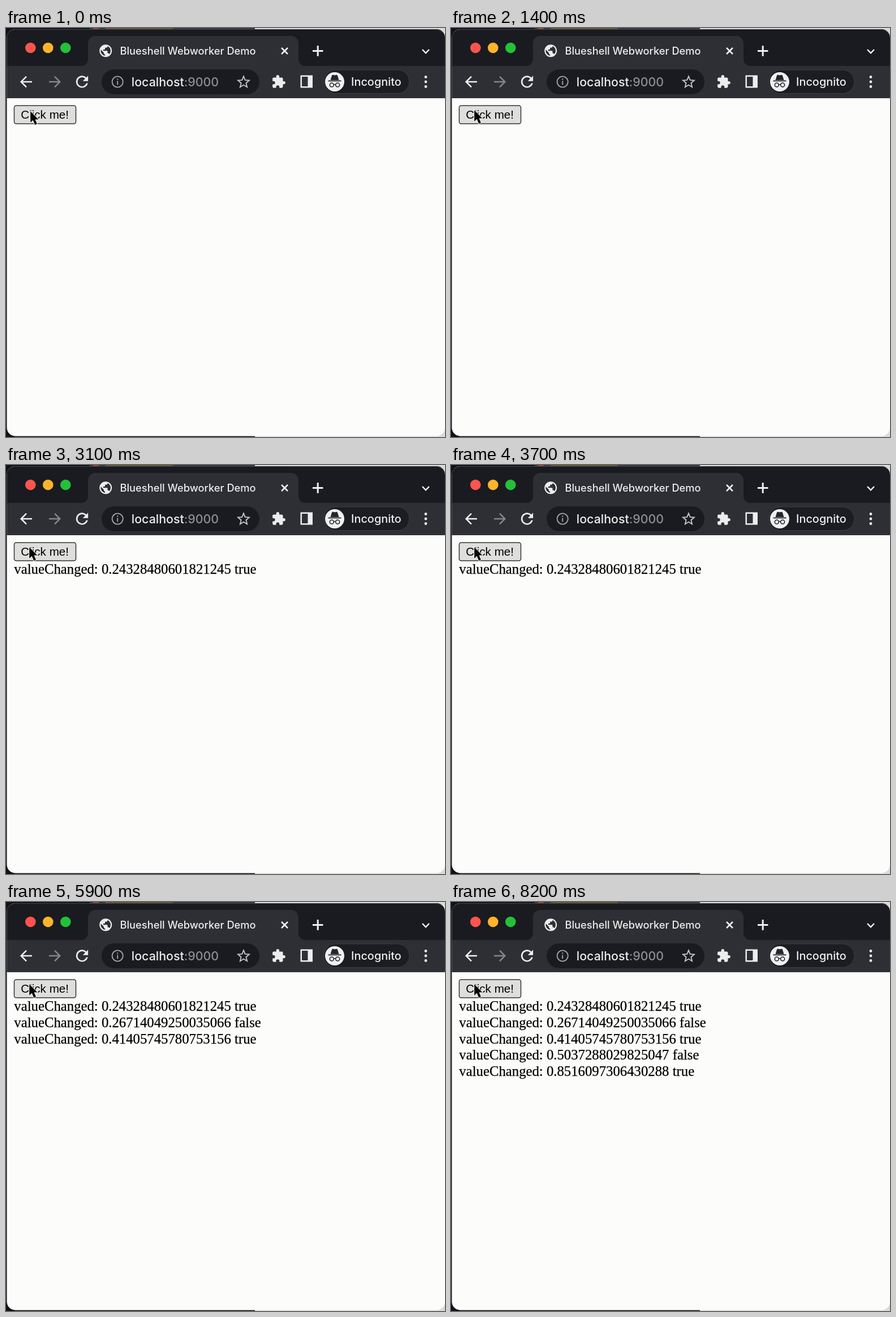
Animation of 776 by 722 pixels, one loop 8300 ms. Source, as an HTML page:

```html
<!DOCTYPE html>
<html lang="en">
<head>
<meta charset="utf-8">
<title>Webworker demo</title>
<style>
  html, body { margin: 0; width: 100%; height: 100%; overflow: hidden; background: #111218; }
  svg { display: block; width: 776px; height: 722px; }
  .ui { font-family: Inter, Roboto, sans-serif; font-weight: 500; fill: #eceded; }
  .button { font: 20.6px "Liberation Sans", Arial, sans-serif; }
  .log { font: 24.75px "Liberation Serif", "Times New Roman", serif; stroke: #000; stroke-width: .25; }
  .line { fill: none; stroke: #f0f0f1; stroke-width: 2.5; }
  .icon { fill: #eceded; }
</style>
</head>
<body>
<svg viewBox="0 0 776 722">
  <!-- desktop behind the window -->
  <path fill="#d9dbd8" d="M440 0H776V722H440z"/>
  <path fill="#35373a" d="M148 0H440V2H148z"/>
  <path fill="#74602f" d="M176 0H295V1.5H176z"/>
  <path fill="#c2472f" d="M154 0h10v1.5h-10z"/>

  <!-- window -->
  <rect x="1.5" y="2" width="774.5" height="718.5" rx="15" fill="#fcfcfb"/>
  <path fill="#191b20" d="M1.5 68V17a15 15 0 0 1 15-15H761a15 15 0 0 1 15 15V68z"/>
  <path fill="none" stroke="#46484c" d="M6 6.500Q10 2.500 16.500 2.500H761Q767 2.500 771 6.500"/>
  <path fill="#2d2f34" d="M1.500 67H133a12 12 0 0 0 12-12V27a13 13 0 0 1 13-13H504a13 13 0 0 1 13 13V55a12 12 0 0 0 12 12H776V124H1.500z"/>
  <path fill="#3a3c40" d="M1.500 123H776v1H1.500z"/>

  <!-- tab strip -->
  <circle cx="43.300" cy="35" r="9.300" fill="#ff544d"/>
  <circle cx="74.300" cy="35" r="9.300" fill="#feb429"/>
  <circle cx="105.300" cy="35" r="9.300" fill="#24c138"/>
  <path class="icon" transform="translate(163 27) scale(1.1)" d="M12 2a10 10 0 1 0 0 20a10 10 0 0 0 0-20zm-1 17.900A8 8 0 0 1 4.200 10.200L9 15v1a2 2 0 0 0 2 2zm6.900-2.500A2 2 0 0 0 16 16h-1v-3a1 1 0 0 0-1-1H8v-2h2a1 1 0 0 0 1-1V7h2a2 2 0 0 0 2-2v-.4a8 8 0 0 1 2.900 12.800z"/>
  <text class="ui" x="201.500" y="47" font-size="18.300">Blueshell Webworker Demo</text>
  <path class="line" d="M487 35l11 11m0-11l-11 11M736 38l6 6.300 6-6.300"/>
  <path class="line" style="stroke-width:3" d="M542 40.500h18.500M551.200 31.300v18.500"/>

  <!-- toolbar -->
  <path class="line" d="M46 95H27m9-9.300L26.700 95l9.300 9.300"/>
  <path class="line" style="stroke:#84868a" d="M76 95H95m-9-9.300l9.300 9.300-9.300 9.300"/>
  <path class="icon" transform="translate(118.500 79) scale(1.330)" d="M17.650 6.350A8 8 0 1 0 19.730 14h-2.080A6 6 0 1 1 16.220 7.780L13 11h7V4z"/>
  <rect x="169" y="73" width="279" height="44" rx="22" fill="#191b20"/>
  <g fill="none" stroke="#a2a4a8" stroke-width="1.900">
    <circle cx="197.200" cy="95" r="9.600"/>
    <path d="M197.200 93.500v6.700M197.200 89.300v2.200"/>
  </g>
  <text class="ui" x="221.800" y="102.500" font-size="21.400">localhost<tspan fill="#8c8e92">:9000</tspan></text>
  <path class="line" style="stroke:#c3c4c7;stroke-width:1.900" d="M420 85.300l2.700 6.600 7.200.6-5.500 4.700 1.700 7-6.100-3.700-6.100 3.700 1.700-7-5.500-4.700 7.200-.6z"/>
  <path class="icon" transform="translate(469 82) scale(1.080)" d="M20.500 11H19V7a2 2 0 0 0-2-2H13V3.500a2.500 2.500 0 0 0-5 0V5H4a2 2 0 0 0-2 2v3.800h1.500a2.700 2.700 0 0 1 0 5.400H2V20a2 2 0 0 0 2 2h3.800v-1.500a2.700 2.700 0 0 1 5.400 0V22H17a2 2 0 0 0 2-2v-4h1.500a2.500 2.500 0 0 0 0-5z"/>
  <path class="icon" fill-rule="evenodd" d="M520.500 83.500H542V105.500H520.500zM523 86V103H533.500V86z"/>
  <rect x="562" y="74" width="151" height="41.500" rx="20.700" fill="#1b1d22" stroke="#3b3d42"/>
  <circle cx="581" cy="95" r="17" fill="#f0f0f1"/>
  <g fill="#24262b">
    <path d="M573.500 92l2.500-8q.7-1.800 2.500-1.200l2.500.7 2.500-.7q1.800-.6 2.500 1.200l2.500 8z"/>
    <path d="M569.500 92.500h23v1.800h-23z"/>
    <g fill="none" stroke="#24262b" stroke-width="1.600">
      <circle cx="575.800" cy="100.500" r="3.500"/>
      <circle cx="586.200" cy="100.500" r="3.500"/>
      <path d="M579.300 100q1.700-1 3.400 0"/>
    </g>
  </g>
  <text class="ui" x="610" y="102" font-size="19.900">Incognito</text>
  <g class="icon">
    <circle cx="742" cy="86.500" r="2.400"/>
    <circle cx="742" cy="95" r="2.400"/>
    <circle cx="742" cy="103.500" r="2.400"/>
  </g>

  <!-- page -->
  <rect x="14.500" y="137" width="109" height="32" rx="3.500" fill="#dededc" stroke="#343434" stroke-width="1.500"/>
  <text class="button" x="26.300" y="159.500">Click me!</text>
  <g id="log" class="log"></g>
  <path id="cursor" fill="#050505" stroke="#fff" stroke-width="1.800" stroke-linejoin="round" paint-order="stroke"
    d="M0 0V20L4.500 15.800 8 24 11.800 22.300 8.400 14.500H14.300z"/>
</svg>
<script>
  const LOOP = 8300;
  const entries = [
    [2500, '0.24328480601821245 true'],
    [3900, '0.26714049250035066 false'],
    [5400, '0.41405745780753156 true'],
    [6400, '0.5037288029825047 false'],
    [7400, '0.8516097306430288 true'],
  ];
  const log = document.getElementById('log');
  const cursor = document.getElementById('cursor');

  const rows = entries.map(([start, value], i) => {
    const row = document.createElementNS(log.namespaceURI, 'text');
    row.setAttribute('x', 14.3);
    row.setAttribute('y', 192 + i * 28.75);
    row.textContent = 'valueChanged: ' + value;
    log.append(row);
    return { row, start };
  });

  function draw(now) {
    const t = now % LOOP;
    for (const { row, start } of rows) {
      row.setAttribute('visibility', t >= start ? 'visible' : 'hidden');
    }
    const p = Math.min(1, Math.max(0, (t - 600) / 400));
    const shift = 2 * p * p * (3 - 2 * p);
    cursor.setAttribute('transform', `translate(${43.2 - shift} ${147 - shift})`);
    requestAnimationFrame(draw);
  }
  draw(0);
</script>
</body>
</html>
```
